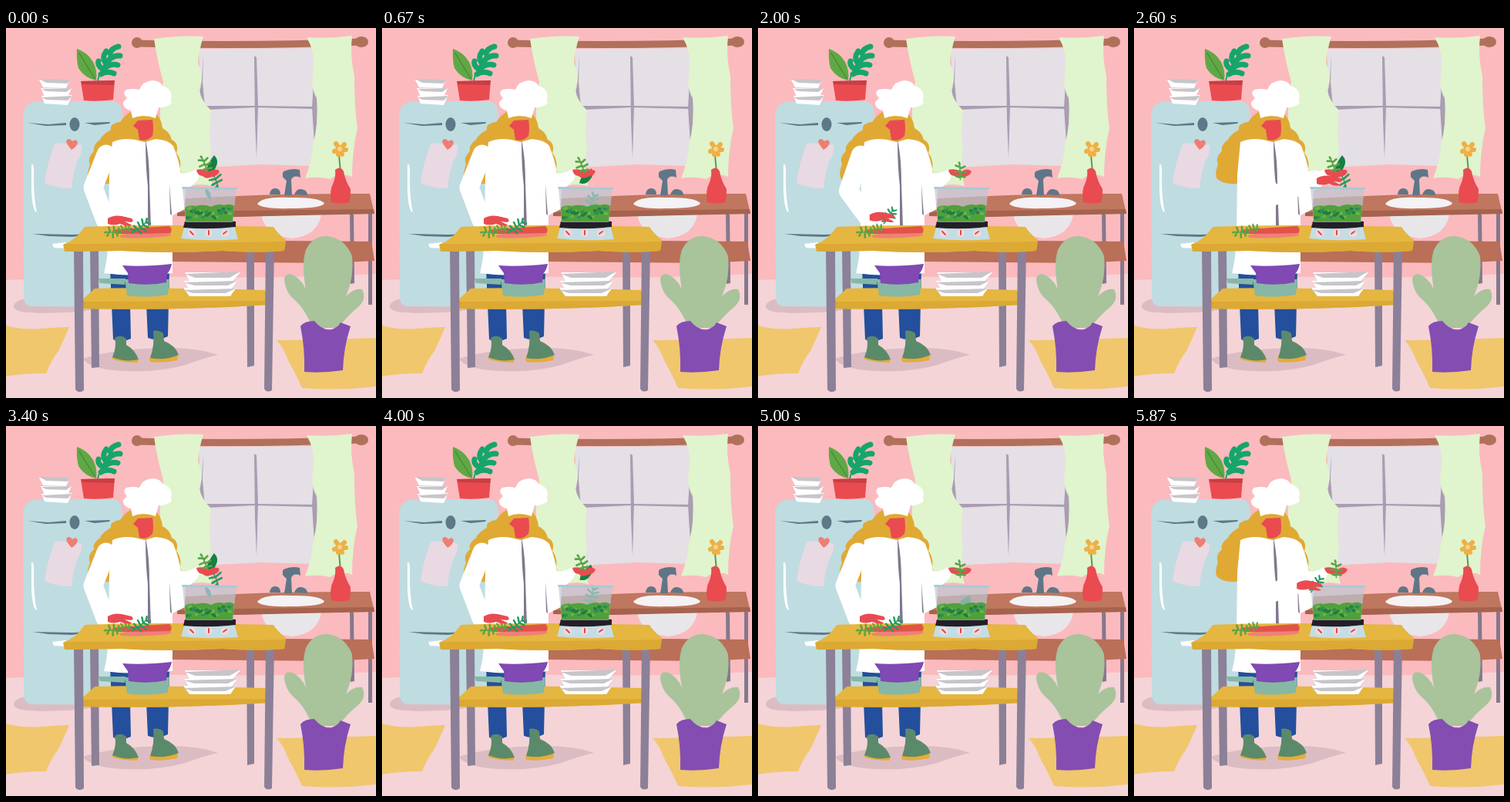
An HTML page for the animation above (5990 ms loop, 480 by 480 pixels).

```html
<!DOCTYPE html>
<html>
<head>
<meta charset="utf-8">
<style>
html, body { margin: 0; width: 100%; height: 100%; overflow: hidden; background: #fbbabe }
svg { display: block; width: 100vw; height: 100vh }
.line { fill: none; stroke-linecap: round; stroke-linejoin: round }
</style>
</head>
<body>
<svg viewBox="0 0 480 480">
<defs>
  <g id="sprig" class="line" stroke="#219b61" stroke-width="2.6">
    <path stroke-width="1.5" d="M0 14Q2 2-1-12"/>
    <path d="M0-10l-4-4M0-10l4-4M0-5l-7-3M0-5l7-4M1 0l-8-1M1 0l8-3M1 5l-7 1M1 5l7-1M0 9l-4 3"/>
  </g>
  <g id="herb" class="line" stroke="#5aa44a" stroke-width="3">
    <path stroke-width="1.6" d="M3 14Q1 3-2-9"/>
    <path d="M-2-8l-1-2M-1-4l-6-1M0-2l6-4M1 2l-8 2M2 4l7-3M2 8l-5 2M3 9l6 0"/>
  </g>
  <path id="leaf" fill="#168043" d="M1-12Q8-5 3 4Q0 11-8 11Q-9 4-6-1Q-3-7 1-12Z"/>
</defs>

<!-- room -->
<path fill="#fbbabe" d="M0 0H480V330H0Z"/>
<path fill="#f4d4d7" d="M0 327Q120 321 240 323T480 319V480H0Z"/>
<path fill="#f0c76c" d="M0 386Q22 392 45 390T82 388Q77 400 68 419Q58 432 52 448Q22 448 0 452ZM351 405Q390 405 480 402V465Q430 471 384 467Q377 451 366 431Q360 414 351 405Z"/>
<g fill="#dcbcc3">
  <path d="M10 360Q14 349 45 350L150 358Q90 373 30 369Q9 368 10 360Z"/>
  <path d="M100 429Q130 419 180 416Q240 412 275 424Q260 427 233 437Q190 449 137 444Q105 439 100 429Z"/>
</g>

<!-- window -->
<path fill="#e4e0e5" d="M250 27L404 26L401 179L330 177L258 181Z"/>
<g fill="#a99db3">
  <path d="M256 34L254 67L251 86L258 103L255 70Z"/>
  <path d="M322 36L325 38L327 100L325 169L323 120Z"/>
  <path d="M401 38L404 100L401 167L397 103Z"/>
  <path d="M258 101L325 101L400 102V105L322 103L262 106Z"/>
</g>
<path class="line" stroke="#b0705a" stroke-width="9" d="M172 20Q310 24 461 18"/>
<g fill="#b0705a"><ellipse cx="170" cy="19" rx="7" ry="7"/><ellipse cx="461" cy="18" rx="9" ry="7"/></g>
<g fill="#e0f4cd">
  <path d="M192 14Q225 9 256 11Q250 30 249 46Q257 61 251 81Q253 94 266 107Q262 135 266 157Q261 180 268 205Q247 200 232 208L205 200Q195 110 204 70Q196 42 192 14Z"/>
  <path d="M390 12Q420 14 449 10Q446 35 452 62Q452 104 456 130Q449 158 449 193Q434 187 420 196Q405 192 388 195Q397 173 398 151Q406 124 403 91Q394 76 399 53Q401 31 390 12Z"/>
</g>

<!-- sink -->
<path fill="#85788c" d="M446 240L451 242L452 331L447 332ZM470 240L475 240L475 359L470 359Z"/>
<path fill="#b96f58" d="M215 289L360 276L474 277L478 302L420 305L215 303Z"/>
<path fill="#f4d4d7" d="M290 270L362 277L362 290L290 288Z" opacity="0"/>
<path fill="#e9e6ea" d="M331 242L409 242Q404 270 371 273Q336 269 331 242Z"/>
<path fill="#c0775f" d="M222 222Q340 214 472 215L478 241L385 242L298 245L222 244Z"/>
<path fill="#a5624d" d="M222 239L300 237L477 235L478 241L385 243L298 245L222 244Z"/>
<path fill="#f4f2f4" d="M326 228Q333 218 368 220Q405 219 413 227Q412 234 368 234Q332 235 326 228Z"/>
<path fill="#5f7687" d="M342 216Q343 208 349 208Q356 208 356 216ZM374 216Q377 208 383 209Q391 210 391 217ZM361 217L364 198Q356 193 360 186Q371 181 381 184L382 194Q373 190 370 197L371 217Z"/>
<path class="line" stroke="#5b9a52" stroke-width="2" d="M432 165L434 187"/>
<g class="line" stroke="#eeb045" stroke-width="6"><path d="M433 157l-5-7M433 157l6-6M433 157l8 1M433 157l-7 3M433 157l3 7M433 157l-2 7"/></g>
<circle cx="433" cy="157" r="3" fill="#f7d489"/>
<path fill="#e94b50" d="M427 184Q434 178 438 186Q440 198 447 209Q447 221 445 226Q434 229 422 226Q419 211 425 200Q428 192 427 184Z"/>

<!-- cactus -->
<path fill="#a9c39b" d="M398 389Q388 365 376 354Q362 343 361 326Q362 317 372 320Q384 327 389 339Q383 306 389 288Q398 269 417 270Q440 273 449 296Q452 323 441 348Q452 337 462 339Q468 350 459 360Q442 374 431 389Z"/>
<path fill="#844db2" d="M382 387Q387 380 400 380Q410 393 423 391Q431 388 434 382L447 387Q438 414 437 444Q411 448 387 446Q388 416 382 387Z"/>

<!-- fridge -->
<path fill="#bfdce1" d="M22 112Q24 96 42 95L137 95Q151 96 151 111L153 362L31 361Q23 359 23 348Z"/>
<g fill="#5d7886">
  <path d="M28 123L55 125L78 123V126L52 127ZM102 123L135 122L134 124L115 126Z"/>
  <ellipse cx="89" cy="125" rx="6.5" ry="9"/>
  <path d="M34 267L86 268L110 267L86 271L55 270Z"/>
</g>
<path fill="#fff" d="M33 177Q37 174 36 195Q36 221 40 239Q34 238 33 210ZM60 280L78 278L80 286L62 285Z"/>
<path fill="#e9d9e2" d="M64 149L98 152Q99 163 93 172Q87 187 85 208Q67 209 50 201Q53 175 64 149Z"/>
<path fill="#ef7d72" d="M85 158Q76 148 79 145Q83 142 86 147Q91 143 93 148Q92 154 85 158Z"/>
<g fill="#fff">
  <path d="M46 88L86 87L80 100L50 98Z"/><path d="M45 78L85 78L80 90L50 89Z"/><path d="M43 67L83 67L78 78L48 77Z"/>
</g>
<path fill="#c6c5c9" d="M43 66L83 67L80 72L52 71ZM46 79L85 78L78 83L52 82ZM46 90L86 88L80 94L52 93Z"/>
<path fill="#5fa845" d="M92 27Q106 32 113 44Q119 56 117 68Q102 65 94 52Q91 40 92 27Z"/>
<path class="line" stroke="#3b7c36" stroke-width="1" d="M95 33L115 65"/>
<g class="line" stroke="#17a56b">
  <path stroke-width="2" d="M119 68Q123 51 140 28"/>
  <path stroke-width="7" d="M129 45Q124 38 130 30M135 33Q137 26 146 24M133 42Q140 35 148 36M127 53Q136 45 145 48M123 60Q131 55 140 59M125 53Q118 48 120 43"/>
</g>
<path fill="#e94b50" d="M97 69L141 68L139 93Q119 96 101 94Z"/>
<path fill="#c83e43" d="M97 69L141 68L140 74L99 73Z"/>

<!-- cook -->
<g fill="#234f9c"><path d="M135 312L160 312L162 403Q150 409 139 404Z"/><path d="M180 312L212 312L210 400Q196 407 184 402Z"/></g>
<path fill="#e5ac36" d="M137 427L172 429L171 434Q153 434 139 430ZM186 428L223 424L222 431Q205 435 187 433Z"/>
<path fill="#5b8a6a" d="M141 402Q149 397 156 403L156 411Q168 418 172 430Q154 434 138 427Q144 413 141 402ZM191 393Q198 391 204 396L205 406Q220 412 224 424Q206 432 187 428Q193 412 191 393Z"/>
<path fill="#e0a934" d="M163 108Q154 113 148 122Q134 124 136 132Q125 138 122 145Q112 152 114 160Q105 168 109 177Q104 190 108 196Q120 205 140 201L222 208Q232 195 226 183Q228 171 221 162Q225 150 215 145Q212 134 203 130Q202 118 194 110Z"/>
<path fill="#fff" d="M138 148Q151 142 168 145L180 148L194 144Q211 145 217 153Q224 170 227 188Q231 190 239 187L247 183Q254 190 248 198Q240 206 233 210L232 235L216 243V318Q170 324 127 318Q132 300 133 270L134 190Z"/>
<path id="seam" fill="#81778d" d="M181 145Q186 168 186 200L188 258L184 256L184 205Q181 180 181 145Z"/>
<path fill="#81778d" d="M212 202L215 243L213 241Z"/>
<path fill="#e94b50" d="M165 127L171 120L190 119Q192 130 190 140Q182 148 173 145L171 132Z"/>
<path fill="#fff" d="M164 117L162 107Q151 105 152 96L157 91Q150 84 156 80Q165 78 173 80Q177 69 190 68Q201 69 203 75Q214 78 215 88Q213 93 215 98Q206 104 198 103L194 117Q178 111 164 117Z"/>
<path id="arm" class="line" stroke="#fff" stroke-width="25"/>

<!-- table -->
<g fill="#8b8097">
  <path d="M109 284L120 284L121 440L111 441ZM312 284L322 284L322 438L313 440Z"/>
</g>
<path fill="#e5b640" d="M115 338Q170 336 336 340L341 359Q220 367 95 364Q95 354 102 350Z"/>
<path fill="#dba934" d="M97 355L338 354L341 359Q220 367 95 364Z"/>
<path fill="#8b8097" d="M88 284L100 284L101 470Q94 475 90 469ZM337 284L348 284L345 470Q338 474 335 468Z"/>
<path fill="#e5b640" d="M102 258Q190 254 347 258Q352 266 363 275L361 289Q330 292 280 289Q210 293 150 289L76 290L74 281Q91 275 102 258Z"/>
<path fill="#dba934" d="M75 280Q200 280 363 277L361 289Q330 292 280 289Q210 293 150 289L76 290Z"/>
<path fill="#86b8a5" d="M120 325L155 325L154 333L122 331ZM154 325L212 326L210 346Q180 351 157 347Z"/>
<path fill="#8049b3" d="M151 308Q180 310 215 306Q214 313 209 319L208 330Q184 335 159 331L158 318Z"/>
<g fill="#fff">
  <path d="M230 337L298 338L291 348L238 348Z"/><path d="M231 328L300 328L292 339L238 339Z"/><path d="M232 317L304 317L294 328L238 328Z"/>
</g>
<path fill="#c6c5c9" d="M232 319L304 316L290 324L245 324ZM231 330L300 328L288 334L244 334ZM230 340L298 338L285 344L242 344Z"/>
<path fill="#f08078" d="M148 269Q178 261 213 265Q216 268 211 270Q178 274 149 272Z"/>
<path fill="#e2524a" d="M138 262Q175 259 212 257Q217 261 213 266Q175 267 142 267Z"/>
<use href="#herb" transform="translate(137 265) rotate(-75) scale(.85)"/>
<use href="#herb" transform="translate(153 261) rotate(-85) scale(.7)"/>
<use id="picked" href="#sprig" transform="translate(174 258) rotate(55) scale(.95)"/>

<!-- falling greens, scale and box -->
<g id="teal"><path fill="#2f8f86" d="M-4-8Q5-3 4 8Q-4 4-4-8Z"/></g>
<use id="dropSprig" href="#sprig"/>
<use id="dropLeaf" href="#leaf"/>
<path fill="#c4dde4" d="M232 256L296 256L301 274Q262 277 227 273Z"/>
<g fill="#f6d9dc"><circle cx="241" cy="266" r="5"/><circle cx="263" cy="266" r="5"/><circle cx="284" cy="266" r="5"/></g>
<path class="line" stroke="#d9484c" stroke-width="2" d="M239 264l4 4M263 263v5M286 264l-4 3"/>
<path fill="#231f24" d="M232 251Q265 248 298 251V258Q264 262 230 259Z"/>
<path fill="#bcc8d3" opacity=".68" d="M229 207L299 208L294 252L233 252Z"/>
<path fill="#a9cad5" d="M228 206L300 207V210L229 209Z"/>
<path fill="#50a03c" d="M232 233Q239 229 246 231Q258 228 266 232Q275 227 283 230Q291 227 296 231L294 251L233 251Z"/>
<g id="bits"></g>

<!-- hands -->
<path fill="#e94b50" d="M247 184Q256 182 264 186Q272 181 277 186Q275 192 267 193Q260 197 255 192Q248 191 247 184Z"/>
<use id="held" href="#herb"/>
<use id="carried" href="#sprig"/>
<path id="hand" fill="#e94b50" d="M0-1Q8-6 18-4L31-1Q35 3 30 4L22 3L32 8Q24 10 16 6Q7 9 0 6Z"/>
</svg>
<script>
const LOOP = 5990, CYCLE = 3400;
const el = id => document.getElementById(id);

// Rows are [time, ...values]; values are joined by straight lines.
function at(rows, t) {
  let i = rows.findIndex(r => r[0] >= t);
  if (i < 0) return rows.at(-1).slice(1);
  if (i === 0) return rows[0].slice(1);
  const a = rows[i - 1], b = rows[i], k = (t - a[0]) / (b[0] - a[0]);
  return a.slice(1).map((v, j) => v + (b[j + 1] - v) * k);
}

// shoulder, elbow, wrist
const REST = [130, 164, 113, 207, 132, 248];
const ARM = [
  [0, ...REST], [1900, ...REST],
  [2200, 140, 167, 126, 220, 170, 234],
  [2470, 149, 169, 160, 223, 211, 205],
  [2600, 150, 170, 180, 218, 237, 196],
  [2750, 150, 170, 180, 218, 237, 196],
  [3000, 142, 167, 136, 220, 182, 226],
  [3280, ...REST], [3400, ...REST]
];
// x, y, angle
const SPRIG = [[0, 271, 196, -20], [600, 271, 222, 20], [950, 270, 250, 40], [2560, 270, 250, 40], [2561, 271, 196, -20]];
const LEAF = [[0, 269, 177, 0], [600, 267, 191, 15], [1330, 268, 214, 45], [1600, 269, 230, 25], [1950, 269, 250, 0],
  [2500, 269, 250, 0], [2501, 265, 186, 20], [2600, 269, 177, 0]];
const TEAL = [[0, 262, 215, 0], [400, 263, 245, 50], [3100, 262, 200, -30], [3400, 262, 215, 0]];
const HELD = [[0, 257, 175, -10], [600, 258, 176, -10], [1200, 262, 184, 10], [2480, 262, 184, 10], [2620, 257, 175, -10]];

const place = (id, [x, y, r], scale = 1) =>
  el(id).setAttribute("transform", `translate(${x} ${y}) rotate(${r}) scale(${scale})`);
const show = (id, on) => el(id).setAttribute("visibility", on ? "visible" : "hidden");

let seed = 7;
const rnd = () => (seed = seed * 16807 % 2147483647) / 2147483647;
for (let i = 0; i < 28; i++) {
  const x = 236 + (i * 13 % 56) + rnd() * 2, y = 234 + rnd() * 13;
  el("bits").innerHTML += `<ellipse cx="${x}" cy="${y}" rx="${2 + rnd() * 2}" ry="1.9" fill="${
    ["#237d3c", "#2b8c5d", "#6bb44c"][i % 3]}" transform="rotate(${rnd() * 90 - 45} ${x} ${y})"/>`;
}

function draw(now) {
  const t = now % LOOP % CYCLE;
  const [sx, sy, ex, ey, wx, wy] = at(ARM, t);
  el("arm").setAttribute("d", `M${sx} ${sy}L${ex} ${ey}L${wx - 3} ${wy + 1}`);
  place("hand", [wx, wy, 0]);
  place("carried", [wx + 25, wy + 1, 35], .85);
  place("dropSprig", at(SPRIG, t));
  place("dropLeaf", at(LEAF, t));
  place("teal", at(TEAL, t));
  place("held", at(HELD, t), .9);
  show("carried", t > 1950 && t < 2560);
  show("picked", t < 1950 || t > 3150);
  show("dropSprig", t < 950 || t >= 2560);
  show("dropLeaf", t < 1950 || t > 2500);
  show("teal", t < 400 || t > 3100);
}
const start = performance.now();
function tick() {
  draw(performance.now() - start);
  requestAnimationFrame(tick);
}
tick();
</script>
</body>
</html>
```
